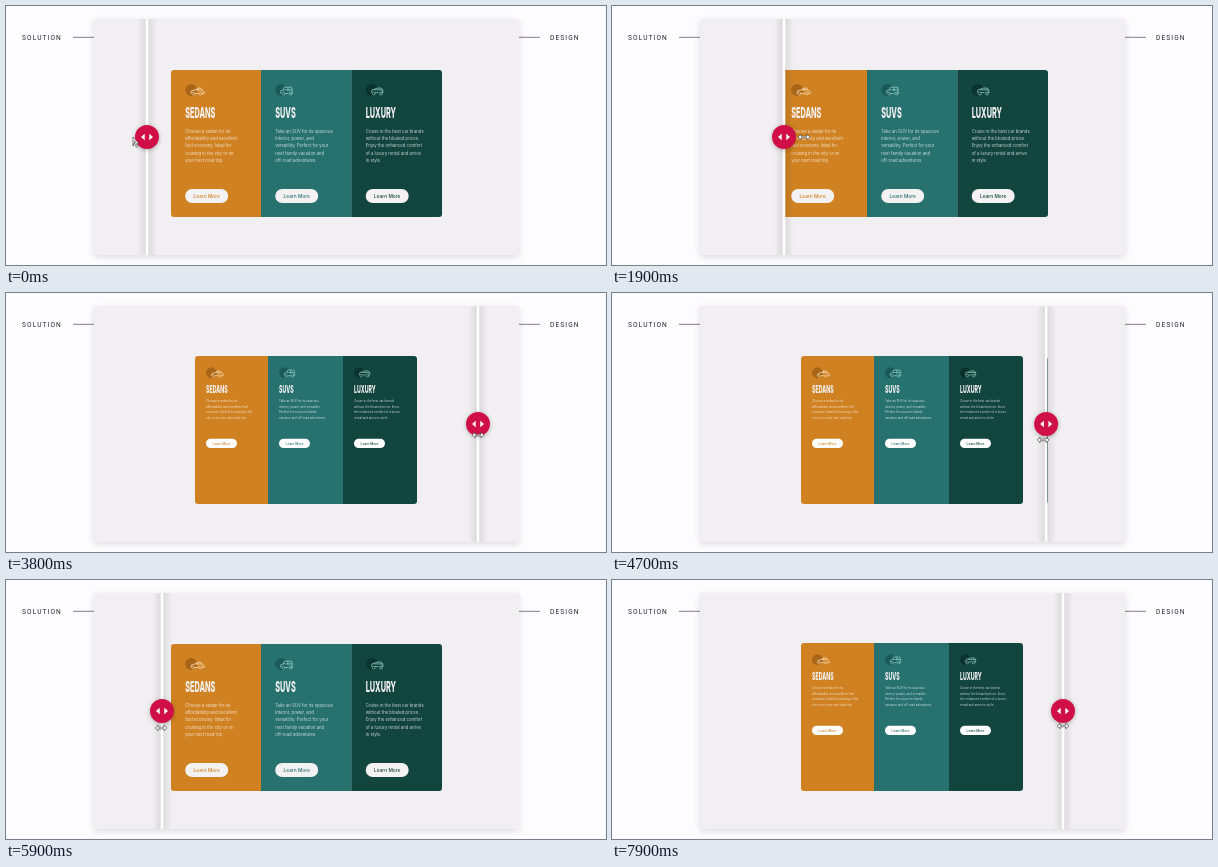
Animation of 600x259 px, one loop 8 s. Source, as an HTML page:

```html
<!DOCTYPE html>
<html lang="en">
<head>
<meta charset="utf-8">
<title>Comparison slider</title>
<style>
html, body { margin: 0; width: 100%; height: 100%; overflow: hidden; background: #fdfcfe; }
svg { display: block; width: 100vw; height: 100vh; }
text { font-family: Inter, "Open Sans", sans-serif; }
.label { font: 6.6px Roboto, Arial, sans-serif; letter-spacing: 1.1px; fill: #28242b; }
.title { font-weight: 800; fill: #f2f0f0; }
.copy { fill: #fff; fill-opacity: .76; }
.button { font-weight: 500; text-anchor: middle; }
.panel { filter: drop-shadow(0 2px 3px #0002); }
.handle { filter: drop-shadow(0 1px 2px #0004); }
</style>
</head>
<body>
<svg viewBox="0 0 600 259">
  <defs>
    <clipPath id="leftClip"><rect id="leftArea" x="88" y="13" height="236"/></clipPath>
    <clipPath id="rightClip"><rect id="rightArea" y="13" height="236"/></clipPath>
    <linearGradient id="shade">
      <stop offset="0" stop-opacity="0"/>
      <stop offset=".5" stop-opacity=".1"/>
      <stop offset="1" stop-opacity="0"/>
    </linearGradient>
  </defs>
  <rect width="600" height="259" fill="#fdfcfe"/>
  <text class="label" x="16" y="33.5">SOLUTION</text>
  <text class="label" x="544" y="33.5">DESIGN</text>
  <path d="M67 31.3H88M513 31.3H534" stroke="#857d87"/>
  <rect class="panel" x="88" y="13" width="425" height="236" fill="#f1eff2"/>
  <g clip-path="url(#leftClip)"><g id="solution"></g></g>
  <g clip-path="url(#rightClip)"><g id="design"></g></g>
  <g id="slider">
    <rect x="-10" y="13" width="20" height="236" fill="url(#shade)"/>
    <rect x="-1.3" y="13" width="2.6" height="236" fill="#fff"/>
    <circle class="handle" cy="131" r="12" fill="#d10f47"/>
    <path d="M-2.3 127.8V134.2L-6 131ZM2.3 127.8V134.2L6 131Z" fill="#fff"/>
  </g>
  <g id="cursor" fill="#fff" stroke="#333" stroke-width=".6" stroke-linejoin="round">
    <path id="arrow" d="M0-4V5L2-.1 1.9 3.2 3.4 6.2 4.7 5.6 3.3 2.7H6Z"/>
    <path id="resize" d="M-6 0L-3-2.7V-.8H3V-2.7L6 0 3 2.7V.8H-3V2.7Z"/>
  </g>
</svg>
<script>
const byId = id => document.getElementById(id);

const vehicles = [
  { title: "SEDANS", color: "#d08222", shade: "#a86517",
    wide: ["Choose a sedan for its", "affordability and excellent", "fuel economy. Ideal for", "cruising in the city or on", "your next road trip."],
    small: ["Choose a sedan for its", "affordability and excellent fuel", "economy. Ideal for cruising in the", "city or on your next road trip."],
    car: "M0 5L1 2 5 1 8-1H11L13 2 15 3V5H12M9 5H4M5 1H13M8-1V2" },
  { title: "SUVS", color: "#27716f", shade: "#195a58",
    wide: ["Take an SUV for its spacious", "interior, power, and", "versatility. Perfect for your", "next family vacation and", "off-road adventures."],
    small: ["Take an SUV for its spacious", "interior, power, and versatility.", "Perfect for your next family", "vacation and off-road adventures."],
    car: "M0 5V2L3 1 4-2H12L13 2V5H11M8 5H4M3 1H13M8-2V2" },
  { title: "LUXURY", color: "#13453f", shade: "#0a332f",
    wide: ["Cruise in the best car brands", "without the bloated prices.", "Enjoy the enhanced comfort", "of a luxury rental and arrive", "in style."],
    small: ["Cruise in the best car brands", "without the bloated prices. Enjoy", "the enhanced comfort of a luxury", "rental and arrive in style."],
    car: "M0 4L1 1 4 0 7-1H11L13 1V4H11M8 4H4M3 1H13" }
];

const layouts = {
  design: { edges: [165, 255, 345.5, 436], top: 64, bottom: 211, pad: 14.2, copy: "wide",
    icon: 84, iconR: 6, carX: 5.5, carScale: .9, titleY: 111.7, titleSize: 15.2,
    copyY: 126.6, leading: 7.4, copySize: 4.25,
    button: { y: 183, w: 43, h: 14, size: 4.8, fill: "#f3f1f1" } },
  solution: { edges: [189, 262, 337, 411], top: 63, bottom: 211, pad: 11, copy: "small",
    icon: 79.7, iconR: 5.4, carX: 5.3, carScale: .8, titleY: 99.7, titleSize: 10.9,
    copyY: 109.1, leading: 5.5, copySize: 2.95,
    button: { y: 145.8, w: 31, h: 9.2, size: 3.25, fill: "#fff" } }
};

function column(v, i, l) {
  const x = l.edges[i], left = x + l.pad, b = l.button;
  const lines = v[l.copy].map((line, n) =>
    `<text class="copy" x="${left}" y="${l.copyY + n * l.leading}" font-size="${l.copySize}">${line}</text>`);
  return `<rect x="${x}" y="${l.top}" width="${l.edges[i + 1] - x + .2}" height="${l.bottom - l.top}" fill="${v.color}"/>
    <circle cx="${left + l.iconR}" cy="${l.icon}" r="${l.iconR}" fill="${v.shade}"/>
    <path transform="translate(${left + l.carX} ${l.icon - 1}) scale(${l.carScale})" d="${v.car}"
      fill="none" stroke="${i ? "#8fcac3" : "#f4d9ad"}" stroke-width=".9"/>
    <g transform="translate(${left} ${l.icon - 1}) scale(${l.carScale})" fill="none"
      stroke="${i ? "#8fcac3" : "#f4d9ad"}" stroke-width=".8">
      <circle cx="9" cy="5" r="1.6"/><circle cx="17" cy="5" r="1.6"/></g>
    <text class="title" transform="translate(${left} ${l.titleY}) scale(.48 1)" font-size="${l.titleSize}">${v.title}</text>
    ${lines.join("")}
    <rect x="${left}" y="${b.y}" width="${b.w}" height="${b.h}" rx="${b.h / 2}" fill="${b.fill}"/>
    <text class="button" x="${left + b.w / 2}" y="${b.y + b.h / 2 + b.size * .36}"
      font-size="${b.size}" fill="${v.color}">Learn More</text>`;
}

for (const [name, l] of Object.entries(layouts)) {
  const width = l.edges[3] - l.edges[0];
  byId(name).innerHTML = `<clipPath id="${name}Card"><rect x="${l.edges[0]}" y="${l.top}"
    width="${width}" height="${l.bottom - l.top}" rx="3"/></clipPath>
    <g clip-path="url(#${name}Card)">${vehicles.map((v, i) => column(v, i, l)).join("")}</g>`;
}

// Each pose: time, slider x, cursor offset from the slider, cursor y
const poses = [
  [0, 141, -14, 135], [300, 141, -4, 132], [900, 167, 4, 131], [1500, 167, 4, 131],
  [1900, 172, 20, 131], [2700, 340, 14, 136], [3500, 472, 0, 140], [4450, 472, 0, 146],
  [5200, 281, -12, 148], [5900, 156, -1, 148], [6350, 156, 0, 148],
  [7200, 278, 10, 147], [7900, 451, 0, 146]
];

const slope = (a, b, k) => (b[k] - a[k]) / (b[0] - a[0]);

function tangent(i, k) {
  if (!i || i === poses.length - 1) return 0;
  const before = slope(poses[i - 1], poses[i], k), after = slope(poses[i], poses[i + 1], k);
  return before * after > 0 ? 2 * before * after / (before + after) : 0;
}

function sample(t, k) {
  const i = Math.min(poses.length - 2, poses.findLastIndex(p => p[0] <= t));
  const a = poses[i], b = poses[i + 1], span = b[0] - a[0], u = (t - a[0]) / span;
  const ease = u * u * (3 - 2 * u);
  return a[k] + (b[k] - a[k]) * ease
    + span * u * (1 - u) * ((1 - u) * tangent(i, k) - u * tangent(i + 1, k));
}

function draw(t) {
  const x = sample(t, 1);
  byId("leftArea").setAttribute("width", x - 88);
  byId("rightArea").setAttribute("x", x);
  byId("rightArea").setAttribute("width", 513 - x);
  byId("slider").setAttribute("transform", `translate(${x} 0)`);
  byId("cursor").setAttribute("transform", `translate(${x + sample(t, 2)} ${sample(t, 3)})`);
  byId("arrow").style.display = t < 300 ? "" : "none";
  byId("resize").style.display = t < 300 ? "none" : "";
}

const start = performance.now();
function tick() {
  const elapsed = (performance.now() - start) % 8000;
  draw(Math.floor(elapsed / 100) * 100);
  requestAnimationFrame(tick);
}
tick();
</script>
</body>
</html>
```
